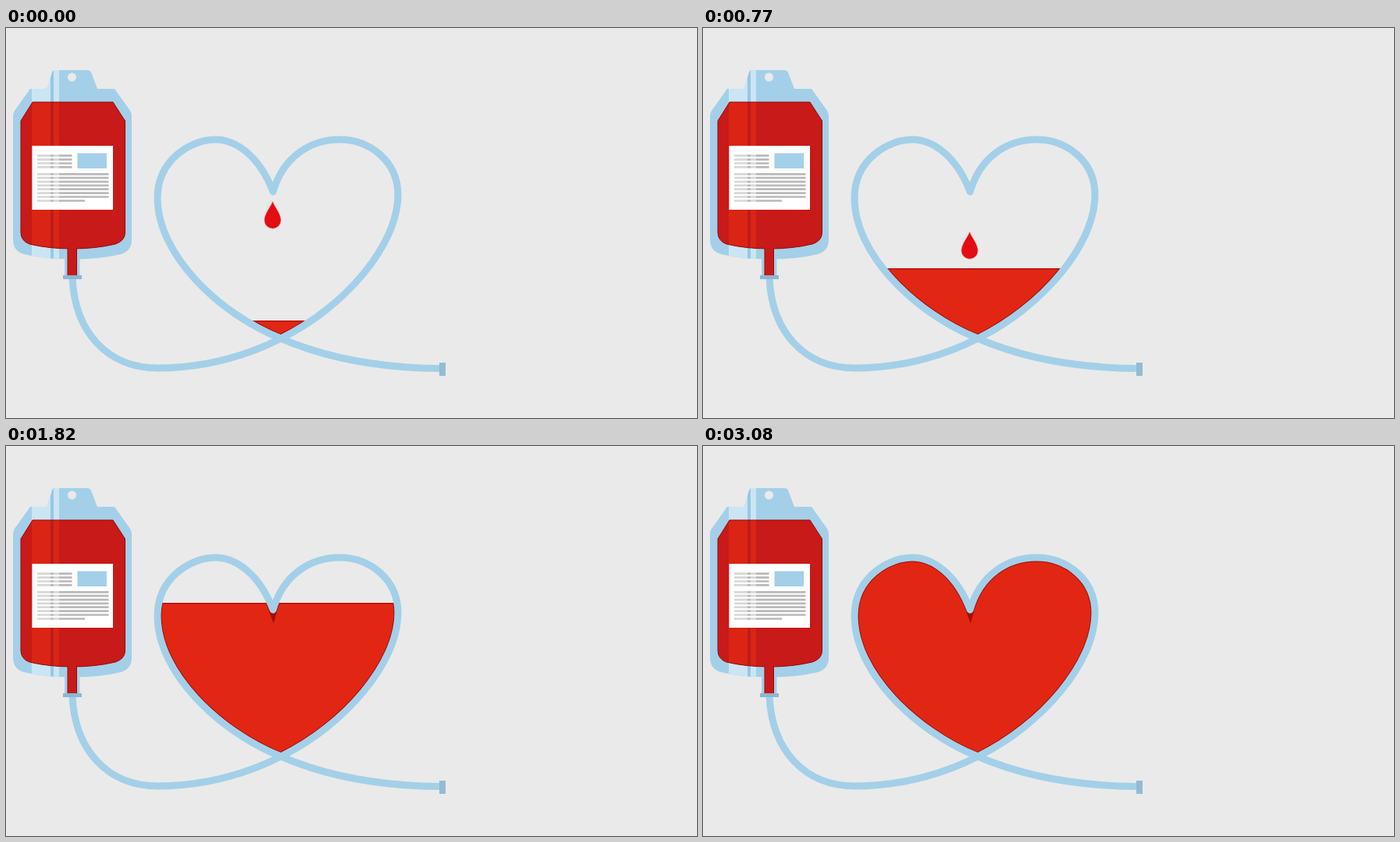
Animation of 885 by 500 pixels, one loop 3150 ms. Source, as an HTML page:

```html
<!DOCTYPE html>
<html lang="en">
<head>
<meta charset="utf-8">
<title>Blood donation</title>
<style>
  html, body { margin: 0; width: 100%; height: 100%; overflow: hidden; background: #eaeaea; }
  svg { display: block; width: 885px; height: 500px; }
</style>
</head>
<body>
<svg viewBox="0 0 885 500">
  <defs>
    <path id="heart" d="M352 398C434 358 502 278 502 214C502 170 465 143 427 143C390 143 355 165 342 210C325 165 295 143 268 143C238 143 194 168 194 218C194 290 272 366 352 398Z"/>
    <path id="bag" d="M31 78H50Q53 78 54 74L59 57Q60 54 63 54H104Q108 54 109 57L117 78H139L159 106Q161 109 161 113V271Q161 286 147 290Q120 296.500 85 296.500T23 290Q9 286 9 271V113Q9 109 11 106Z"/>
    <path id="blood" d="M34 95H137L152.500 119V262Q152.500 273 140 277Q115 283 85 283T30 277Q19 273 19 262V119Z"/>
    <clipPath id="inHeart"><use href="#heart"/></clipPath>
    <clipPath id="inBag"><use href="#bag"/></clipPath>
    <clipPath id="inBlood"><use href="#blood"/></clipPath>
    <clipPath id="filled"><rect id="level" x="180" width="340" height="300"/></clipPath>
    <path id="shine" d="M33 50H57V300H33ZM61 50H68V300H61Z"/>
  </defs>

  <!-- bag -->
  <path d="M75 288H94.500V319H75Z" fill="#a3d0e8"/>
  <use href="#bag" fill="#a3d0e8"/>
  <g clip-path="url(#inBag)">
    <use href="#shine" fill="#cbe5f4"/>
    <path d="M57 50H61V300H57Z" fill="#96c8e3"/>
  </g>
  <circle cx="84.500" cy="63" r="5.500" fill="#eaeaea"/>
  <use href="#blood" fill="#c81a18"/>
  <g clip-path="url(#inBlood)">
    <use href="#shine" fill="#da2515"/>
    <path d="M57 90H61V290H57Z" fill="#bd1c17"/>
  </g>
  <use href="#blood" fill="none" stroke="#980806"/>
  <path d="M79 282V318H90.500V282" fill="#c81a18" stroke="#980806"/>

  <!-- label -->
  <path d="M33.500 151H137V233H33.500Z" fill="#fff"/>
  <path d="M91.500 160.500H129V180H91.500Z" fill="#a3d0e8"/>
  <path d="M40 163.700H84.500m-44.500 4.900h44.500m-44.500 4.900h44.500m-44.500 4.900h44.500M40 187.300H131.500m-91.500 4.900h91.500m-91.500 4.900h91.500m-91.500 4.800h91.500m-91.500 4.800h91.500m-91.500 4.900h91.500m-91.500 4.900h91.500M40 221.500H101" stroke="#b9b9b9" stroke-width="2.700"/>
  <path d="M33.500 151H57V233H33.500ZM61 151H68V233H61Z" fill="#fff" opacity=".42"/>

  <!-- contents of the heart -->
  <g clip-path="url(#inHeart)">
    <g id="drops" fill="#e30d14" stroke="#f0b9b3" stroke-width=".7"></g>
    <g clip-path="url(#filled)">
      <use href="#heart" fill="#e22614"/>
      <use href="#heart" fill="none" stroke="#a60c08" stroke-width="11"/>
      <path id="surface" d="M180 .700H520" stroke="#b5120c" stroke-width="1.400"/>
    </g>
  </g>

  <!-- tube -->
  <g fill="none" stroke="#a3d0e8" stroke-width="9" stroke-linejoin="round">
    <use href="#heart"/>
    <path d="M85 320C88 390 130 436 195 436C260 436 315 417 352 398C412 424 482 436 557 436.500"/>
  </g>
  <path d="M73 317H97V322H73Z" fill="#8ab9d2"/>
  <path d="M555 429H563V446H555Z" fill="#93bcd4"/>
</svg>
<script>
const STEP = 70, STEPS = 45, PERIOD = 2.37;
const $ = id => document.getElementById(id);

// [time in steps, y]
const rise = [[0, 375], [7, 331], [11, 308], [17, 268], [22, 238], [30, 164], [32, 145]];
const fall = [[-1.1, 172], [-0.85, 186], [-0.11, 221], [0, 222], [0.41, 228], [0.67, 239], [1.52, 261], [2.27, 345], [2.6, 400]];

function at(keys, t) {
  const i = keys.findIndex(k => k[0] > t);
  if (i < 0) return keys[keys.length - 1][1];
  if (i === 0) return keys[0][1];
  const [t0, y0] = keys[i - 1], [t1, y1] = keys[i];
  return y0 + (y1 - y0) * (t - t0) / (t1 - t0);
}

const drops = [0, 1].map(() => {
  const drop = document.createElementNS("http://www.w3.org/2000/svg", "path");
  drop.setAttribute("d", "M0 0C3 8 10.700 16 10.700 24.500A10.700 10.700 0 0 1 -10.700 24.500C-10.700 16 -3 8 0 0Z");
  return $("drops").appendChild(drop);
});

function draw(now) {
  const step = Math.floor(now / STEP) % STEPS;
  const y = at(rise, step);
  $("level").setAttribute("y", y);
  $("surface").setAttribute("transform", `translate(0 ${y})`);

  const phase = (step + 0.85) % PERIOD - 0.85;
  drops.forEach((drop, i) => {
    const age = phase + i * PERIOD;
    drop.setAttribute("transform", `translate(341.5 ${at(fall, age)})`);
    // the first drop has none ahead of it
    drop.style.display = age > step + 1 ? "none" : "";
  });
  requestAnimationFrame(draw);
}
draw(0);
</script>
</body>
</html>
```
